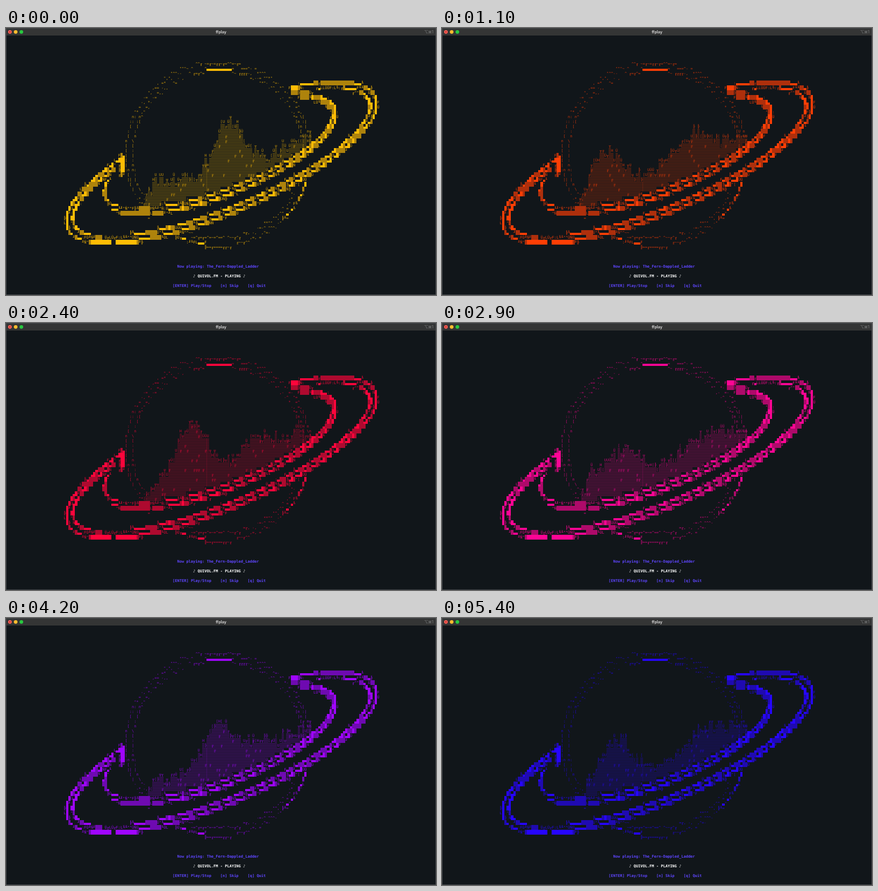
These frames come from a looping animation (800 px wide and 498 px high, 5.5 s). An HTML page with a canvas:

```html
<!DOCTYPE html>
<html lang="en">
<head>
<meta charset="utf-8">
<title>ffplay</title>
<style>
  html, body { margin: 0; width: 100%; height: 100%; overflow: hidden; background: #11161a; }
  canvas { display: block; }
</style>
</head>
<body>
<canvas id="stage" width="800" height="498"></canvas>
<script>
const ctx = document.getElementById('stage').getContext('2d');
const LOOP = 5500, STEP = 100;

// Terminal grid
const COLS = 188, ROWS = 48, CW = 4.225, RH = 9, X0 = 1.7, Y0 = 17.3;
const colX = c => X0 + c * CW;
const rowY = r => Y0 + r * RH;
const colAt = x => Math.floor((x - X0) / CW);
const rowAt = y => Math.floor((y - Y0) / RH);
const MONO = '7.02px "DejaVu Sans Mono", monospace';

// Ring edges are sheared ellipses, drawn from one angle to another (degrees)
const HOLE = { cx: 395, cy: 234, rx: 212, ry: 73, slope: 0.34, from: -37, to: 199, width: 4.5 };
const RINGS = [
  { cx: 401, cy: 251, rx: 289, ry: 102, slope: 0.38, from: -64, to: 231, width: 5.5 },
  { cx: 401, cy: 251, rx: 277, ry: 91, slope: 0.38, from: -50, to: 225, width: 5.5 },
  { cx: 395, cy: 235, rx: 219, ry: 83, slope: 0.34, from: -39, to: 155, width: 5.5 },
  HOLE
];
const PLANET = { cx: 395, cy: 236, rx: 172, ry: 170 };

// Patches of even density: x, y, width, height, density
const PATCHES = [
  [374, 75.8, 46, 4.5, 1], [158, 395.3, 38, 9, 1], [196, 395.3, 8.5, 9, 0], [204.5, 395.3, 40, 9, 1],
  [530, 107.3, 14, 14, 1], [211, 236, 9, 39, 1], [581, 98.3, 51, 9, 0.58], [545, 116.3, 22, 18, 0.58],
  [250, 332.3, 20, 18, 0.58], [585, 107.3, 42, 9, 0.2], [180, 386.3, 42, 9, 0.2]
];

// Spectrum humps (x, height) and hue at a few steps
const POSES = [
  { step: 0,  hue: 44,   humps: [[290, 25], [412, 95]] },
  { step: 6,  hue: 28,   humps: [[322, 50], [435, 60]] },
  { step: 15, hue: 2,    humps: [[300, 95], [480, 75]] },
  { step: 24, hue: -13,  humps: [[345, 105], [465, 40]] },
  { step: 35, hue: -60,  humps: [[282, 55], [500, 45]] },
  { step: 42, hue: -83,  humps: [[395, 78], [460, 15]] },
  { step: 54, hue: -112, humps: [[325, 70], [490, 35]] }
];

const lerp = (a, b, k) => a + (b - a) * k;
const rad = deg => deg * Math.PI / 180;
const hash = (a, b) => {
  const s = Math.sin(a * 12.9898 + b * 78.233) * 43758.5453;
  return s - Math.floor(s);
};
const pick = (chars, a, b) => chars[Math.floor(hash(a, b) * chars.length)];

// Density of every half cell
function cellDensity() {
  const mask = document.createElement('canvas');
  mask.width = COLS;
  mask.height = ROWS * 2;
  const m = mask.getContext('2d');
  m.setTransform(1 / CW, 0, 0, 2 / RH, -X0 / CW, -Y0 * 2 / RH);
  for (const { cx, cy, rx, ry, slope, from, to, width } of RINGS) {
    m.beginPath();
    for (let deg = from; deg <= to; deg++) {
      const dx = rx * Math.cos(rad(deg));
      m.lineTo(cx + dx, cy - slope * dx + ry * Math.sin(rad(deg)));
    }
    m.lineWidth = width;
    m.stroke();
  }
  m.lineWidth = 3.5;
  for (const [from, to] of [[17, 46], [97, 118]]) {
    m.beginPath();
    m.ellipse(PLANET.cx, PLANET.cy, PLANET.rx, PLANET.ry, 0, rad(from), rad(to));
    m.stroke();
  }
  for (const [x, y, w, h, density] of PATCHES) {
    m.clearRect(x, y, w, h);
    m.globalAlpha = density;
    m.fillRect(x, y, w, h);
  }
  const data = m.getImageData(0, 0, COLS, ROWS * 2).data;
  return (c, half) => data[(half * COLS + c) * 4 + 3] / 255;
}

// Each cell becomes a block, a lower half block, a shade or a letter
function buildArt() {
  const density = cellDensity(), art = new Map();
  const put = (c, r, kind, char) => art.set(r * COLS + c, { c, r, kind, char });
  for (let r = 0; r < ROWS; r++) for (let c = 0; c < COLS; c++) {
    const top = density(c, 2 * r), low = density(c, 2 * r + 1);
    if (Math.min(top, low) > 0.6) put(c, r, 'full');
    else if (low > 0.55 && top < 0.4) put(c, r, 'lower');
    else if (top + low > 1.05) put(c, r, 'shade');
    else if (top > 0.55) put(c, r, 'glyph', pick('╙╜ÑÜ"', c, r));
    else if (top + low > 0.35) put(c, r, 'glyph', pick('╓LF╚Ü╠:', c, r));
  }

  // Double limb, hidden where the rings pass in front
  for (const inset of [0, 12]) for (let deg = 0; deg < 360; deg += 0.9) {
    if (deg < 17 || deg > 353 || (deg > 119 && deg < 137)) continue;
    const cos = Math.cos(rad(deg)), sin = Math.sin(rad(deg));
    const c = colAt(PLANET.cx + (PLANET.rx - inset) * cos);
    const r = rowAt(PLANET.cy + (PLANET.ry - inset) * sin);
    if (art.has(r * COLS + c) || hash(c, r) < 0.1) continue;
    const steep = Math.abs(cos);
    const chars = steep < 0.35 ? '=~^╓≈' : steep > 0.9 ? '|[\\:n' : '^",-=*';
    put(c, r, 'limb', pick(chars, r, c));
  }
  return art;
}

const art = buildArt();

function box(x, y, w, h, alpha) {
  ctx.globalAlpha = alpha;
  const l = Math.round(x), t = Math.round(y);
  ctx.fillRect(l, t, Math.round(x + w) - l, Math.round(y + h) - t);
}
function glyph(char, c, r, alpha) {
  ctx.globalAlpha = alpha;
  ctx.fillText(char, colX(c), rowY(r) + RH / 2);
}

function drawCell({ c, r, kind, char }) {
  const x = colX(c), y = rowY(r);
  if (kind === 'full') box(x, y, CW, RH, 1);
  else if (kind === 'shade') box(x, y, CW, RH, 0.66);
  else if (kind === 'lower') box(x, y + RH / 2, CW, RH / 2, 1);
  else glyph(char, c, r, kind === 'limb' ? 0.8 : 0.9);
}

// Front edge of the hole in the rings, where the spectrum stands
function floorAt(x) {
  const dx = x - HOLE.cx;
  return HOLE.cy - HOLE.slope * dx + HOLE.ry * Math.sqrt(1 - (dx / HOLE.rx) ** 2);
}
const heightAt = (x, humps) =>
  humps.reduce((sum, [at, height]) => sum + height * Math.exp(-(((x - at) / 40) ** 2)), 34);

function drawSpectrum(from, to, k, step) {
  for (let c = colAt(256); c < colAt(568); c++) {
    const x = colX(c) + CW / 2, base = floorAt(x);
    const taper = Math.min(1, (x - 248) / 30, (595 - x) / 50);
    const height = lerp(heightAt(x, from.humps), heightAt(x, to.humps), k);
    const first = Math.round((base - height * taper - Y0) / RH + 2.4 * (hash(c, step + 7) - 0.5));
    for (let r = first; rowY(r) < base; r++) {
      const cell = art.get(r * COLS + c);
      if (cell && cell.kind !== 'limb') continue;
      if (r > first) {
        box(colX(c), rowY(r), CW, RH, 0.14);
        for (let line = 1; line < RH; line += 3) box(colX(c), rowY(r) + line, CW, 1, 0.16);
      }
      if (r === first || hash(c + step, r) < 0.1) glyph(pick('╔Ü[╠H╥U╦', c + step, r), c, r, 0.7);
    }
  }
}

function label(text, x, y, color, font = 'bold ' + MONO, align = 'left') {
  ctx.font = font;
  ctx.textAlign = align;
  ctx.fillStyle = color;
  ctx.fillText(text, x, y);
}
function dot(x, radius, color) {
  ctx.fillStyle = color;
  ctx.beginPath();
  ctx.arc(x, 7.3, radius, 0, Math.PI * 2);
  ctx.fill();
}

function drawWindow() {
  ctx.globalAlpha = 1;
  ctx.fillStyle = '#11161a';
  ctx.fillRect(0, 0, 800, 498);
  ctx.fillStyle = '#343535';
  ctx.fillRect(0, 0, 800, 14);
  ctx.strokeStyle = '#43474a';
  ctx.lineWidth = 1;
  ctx.strokeRect(0.5, 0.5, 799, 497);
  dot(7.3, 3.4, '#ff5f57');
  dot(7.3, 1.1, '#8c1a16');
  dot(18, 3.4, '#febc2e');
  dot(28.6, 3.4, '#28c840');
  label('ffplay', 400, 7.5, '#cfcfcf', 'bold 7px Inter, sans-serif', 'center');
  label('⌥⌘1', 795, 7.5, '#858787', '7px Inter, "DejaVu Sans", sans-serif', 'right');
  label('Now playing: The_Fern-Dappled_Ladder', 318.5, 445.2, '#5f46ff');
  label('♪ QUIVOL.FM - PLAYING ♪', 348.1, 463.2, '#ffffff');
  label('[ENTER] Play/Stop    [n] Skip    [q] Quit', 310.1, 481.2, '#5f46ff');
}

function draw(step) {
  const next = Math.max(1, POSES.findIndex(pose => pose.step >= step));
  const from = POSES[next - 1], to = POSES[next];
  const k = (step - from.step) / (to.step - from.step);

  ctx.textBaseline = 'middle';
  drawWindow();
  ctx.font = MONO;
  ctx.textAlign = 'left';
  ctx.fillStyle = `hsl(${(lerp(from.hue, to.hue, k) + 360) % 360}, 100%, 51%)`;
  drawSpectrum(from, to, k, step);
  art.forEach(drawCell);
}

let shown = -1;
function tick() {
  const step = Math.floor(performance.now() % LOOP / STEP);
  if (step !== shown) draw(shown = step);
  requestAnimationFrame(tick);
}
tick();
</script>
</body>
</html>
```
